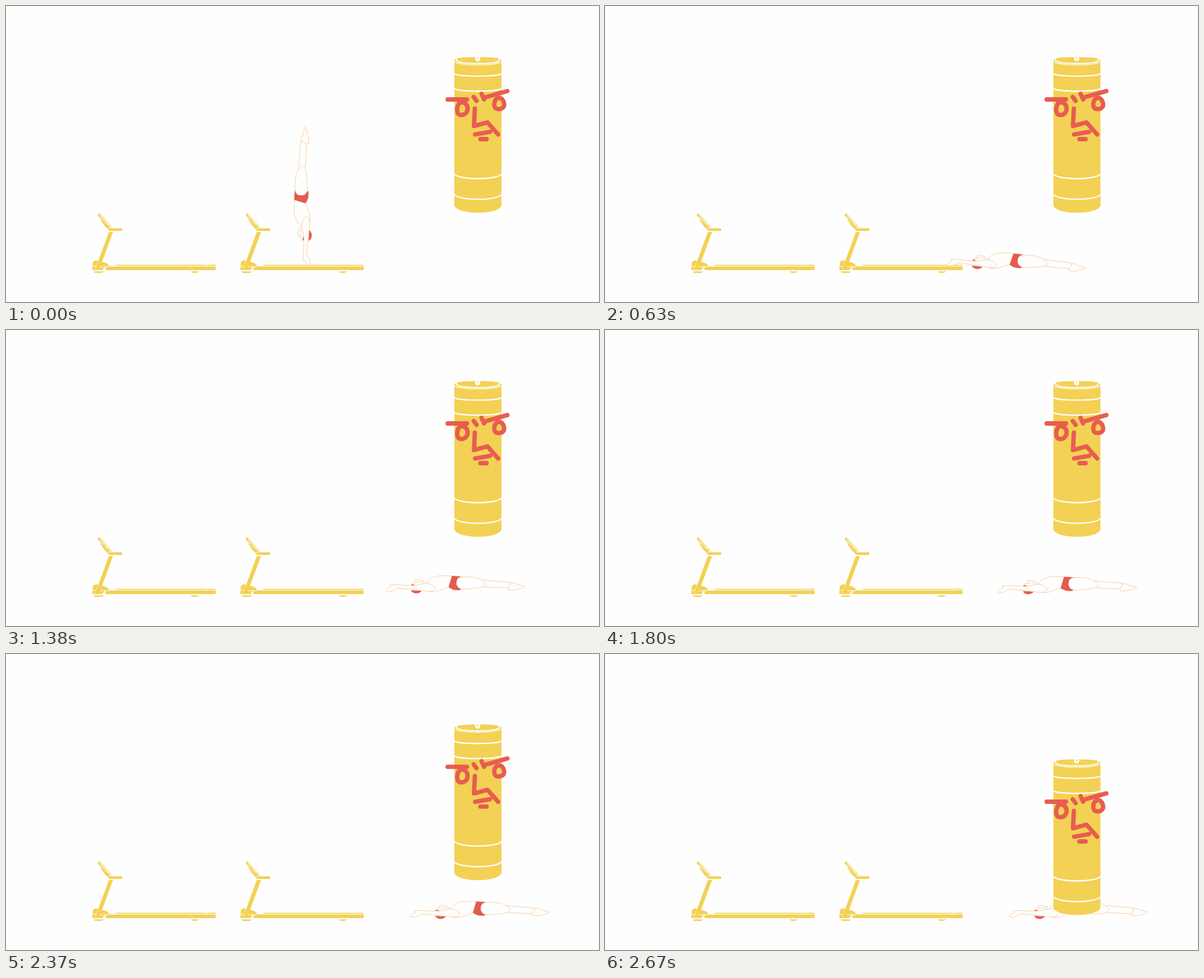
An HTML page for the animation above (6.06 s loop, 1058 by 529 pixels).

```html
<!DOCTYPE html>
<html lang="en">
<head>
<meta charset="utf-8">
<title>Treadmill fall</title>
<style>
  html, body { margin: 0; width: 100%; height: 100%; overflow: hidden; background: #fefefe; }
  svg { display: block; width: 100vw; height: 100vh; }
  .yellow { fill: #f3d155; }
  .white { fill: #fefefe; }
  .red { fill: #e35c4f; }
  .gap { fill: none; stroke: #fefefe; stroke-width: 2.3; }
  .thin { stroke-width: 1.1; }
  .halo { fill: #fefefe; stroke: #fefefe; stroke-width: 4; }
  .skin { fill: #fefefe; stroke: #f6c090; stroke-width: .8; stroke-linejoin: round; stroke-linecap: round; }
  .line { fill: none; }
  .face { fill: none; stroke: #e75d50; stroke-width: 7.8; stroke-linecap: round; stroke-linejoin: round; }
</style>
</head>
<body>
<svg viewBox="0 0 1058 529">
  <defs>
    <g id="treadmill" class="yellow">
      <path d="M178 465.6H374V472H176Z"/>
      <path d="M195 462.6H357.5V464.3H197ZM359 462.6H374V464.3H359Z"/>
      <path d="M154.5 464L155 458Q157 454.5 162 454.5L164 456L158 472H154Z"/>
      <path d="M168 457Q176 457 183 462V465H166Z"/>
      <path d="M183.5 404H191L168.5 465H177L173 472H158.5Z"/>
      <rect x="183" y="397.2" width="24.5" height="4.8" rx="1.5"/>
      <path d="M165 370.8Q167.5 370.5 169 372.5L187.5 393L183 391.5L163.5 374.5Z"/>
      <path d="M167.5 380.5L173 383.5L182 392L190 395.8H184L182.5 400L175.5 392.5Z"/>
      <path d="M156 474.2H174L172 477H159ZM329.5 474.2H344.5Q342 477 339 477H334Q331 477 329.5 474.2Z"/>
      <path class="gap thin" d="M154 465H160M168 466H183M172 472L176 467.5L179 473M167.5 373.5L184 391"/>
    </g>
  </defs>

  <use href="#treadmill"/>
  <use href="#treadmill" x="264"/>

  <!-- Swimmer lying flat, fingertips at 0,0 -->
  <g id="swimmer">
    <path class="skin" d="M46 -4Q47 -9 52 -11Q51 -14 54 -15L57 -13.5Q58 -16.5 61 -15L64 -13Q69 -15 68 -10L70 -5L64 4H48Z"/>
    <path class="skin line" d="M51 -9Q55 -12 58 -10M60 -12L62 -10L65 -11"/>
    <path class="red" d="M44.5 4Q54 5 64 4.5Q61 9.5 54 9.5Q47 9 44.5 4ZM45.5 -7Q51 -7 54 -3.5Q49 -5 45.5 -5.5Z"/>
    <path class="skin" d="M72 -8.5C77 -17 85 -21.5 100 -22L118 -21.5L112 -1.5C100 2 92 7.5 80 7L72 4.5Z"/>
    <path class="red" d="M118 -21.7Q128 -22 137 -20L134 3Q122 6 112 -1.5Z"/>
    <path class="skin" d="M174 -14.5C190 -12 206 -12 222 -10V0C205 -1 190 0 174 -2.5Z"/>
    <path class="skin" d="M225 -10Q234 -6 248 -3Q244 1 234 2.5Q227 5 218 3.5Q217 0 220 -3Q221 -8 225 -10Z"/>
    <path class="white" d="M126 -9C126 -17 130 -20 138 -20C155 -21 170 -18 177 -10C181 -5 174 -1 165 0C150 1 142 2.5 136 2C130 1 126 -3 126 -9Z"/>
    <path class="skin line" d="M136 -20C155 -21 170 -18 177 -10C181 -5 174 -1 165 0C150 1 142 2.5 136 2"/>
    <path class="skin" d="M18 -5.5L44 -4.5Q52 -4 60 -6C72 -11 85 -7 87.5 -1C89 4 83 6.5 75 6C65 5 55 4 45 2.5L18 0Z"/>
    <path class="skin" d="M21 -5.5L8 -6Q6 -4.5 10 -2.5L4 1Q-1 4 1 6.5Q9 8 17 2L22 -.5"/>
  </g>

  <g id="bag">
    <path class="halo" d="M800 97V356C803 374 881 374 884 356V97Z"/>
    <path class="yellow" d="M800 97Q800 91 842 91Q884 91 884 97V356C881 374 803 374 800 356Z"/>
    <path class="gap thin" d="M800 97Q800 90.5 842 90.5Q884 90.5 884 97"/>
    <path class="gap" d="M802.5 92L804.5 98C812 104.5 872 104.5 879.5 98L881.500 92"/>
    <path class="gap thin" d="M799.500 99C808 107.7 876 107.7 884.500 99"/>
    <circle class="white" cx="841.5" cy="94" r="4.8"/>
    <circle class="yellow" cx="841.5" cy="93" r="1.3"/>
    <path class="gap" d="M799 120.5C806 127 878 127 885 120.5M799 147C806 154 878 154 885 147M799 299.5C806 311.5 878 311.5 885 299.5M799 336C806 348.5 878 348.5 885 336"/>
    <g class="face">
      <path d="M788 167H822.5M834.5 162.5L839.5 169.5M848.5 157L853 167M854 163.5L894.5 152"/>
      <path d="M812 171.5C803 176 803 193 810 194.5C818 196 824 190 823.5 182C823 175 818 172 812 171.5Z"/>
      <path d="M878 164.5C870 167 869 181 875 183.5C884 186 890 181 888.5 174C887 167 884 164 878 164.5Z"/>
      <path d="M836.5 183.500L835 214.5L859 208L878 229.5M837 229.5L863.5 225M846.5 238H857.5"/>
    </g>
  </g>
</svg>
<script>
  const LOOP = 6060, STEP = 30;
  const LANDED = 705, SETTLED = 990, OVERSHOOT = 6.2;
  const DROP_START = 2167, DROP_END = 2670, DROP = 97;
  // time, x, y of the fingertips
  const path = [[0, 536, 464.5], [630, 610, 457.5], [1260, 671, 460.7], [2160, 721, 464]];
  const swimmer = document.getElementById('swimmer');
  const bag = document.getElementById('bag');

  const progress = (t, from, to) => Math.min(1, Math.max(0, (t - from) / (to - from)));
  const ease = p => p * p * (3 - 2 * p);

  function handsAt(t) {
    const next = path.findIndex(key => key[0] > t);
    const i = next < 0 ? path.length - 1 : next;
    const [t0, x0, y0] = path[i - 1], [t1, x1, y1] = path[i];
    const p = progress(t, t0, t1);
    return [x0 + (x1 - x0) * p, y0 + (y1 - y0) * p];
  }

  function angleAt(t) {
    return t < LANDED
      ? -90 + (90 + OVERSHOOT) * ease(progress(t, 0, LANDED))
      : OVERSHOOT * (1 - ease(progress(t, LANDED, SETTLED)));
  }

  function render(t) {
    const [x, y] = handsAt(t);
    swimmer.setAttribute('transform', `translate(${x} ${y}) rotate(${angleAt(t)})`);
    bag.setAttribute('transform', `translate(0 ${DROP * ease(progress(t, DROP_START, DROP_END))})`);
  }

  const start = performance.now();
  function tick() {
    const t = (performance.now() - start) % LOOP;
    render(Math.floor(t / STEP) * STEP);
    requestAnimationFrame(tick);
  }
  render(0);
  requestAnimationFrame(tick);
</script>
</body>
</html>
```
